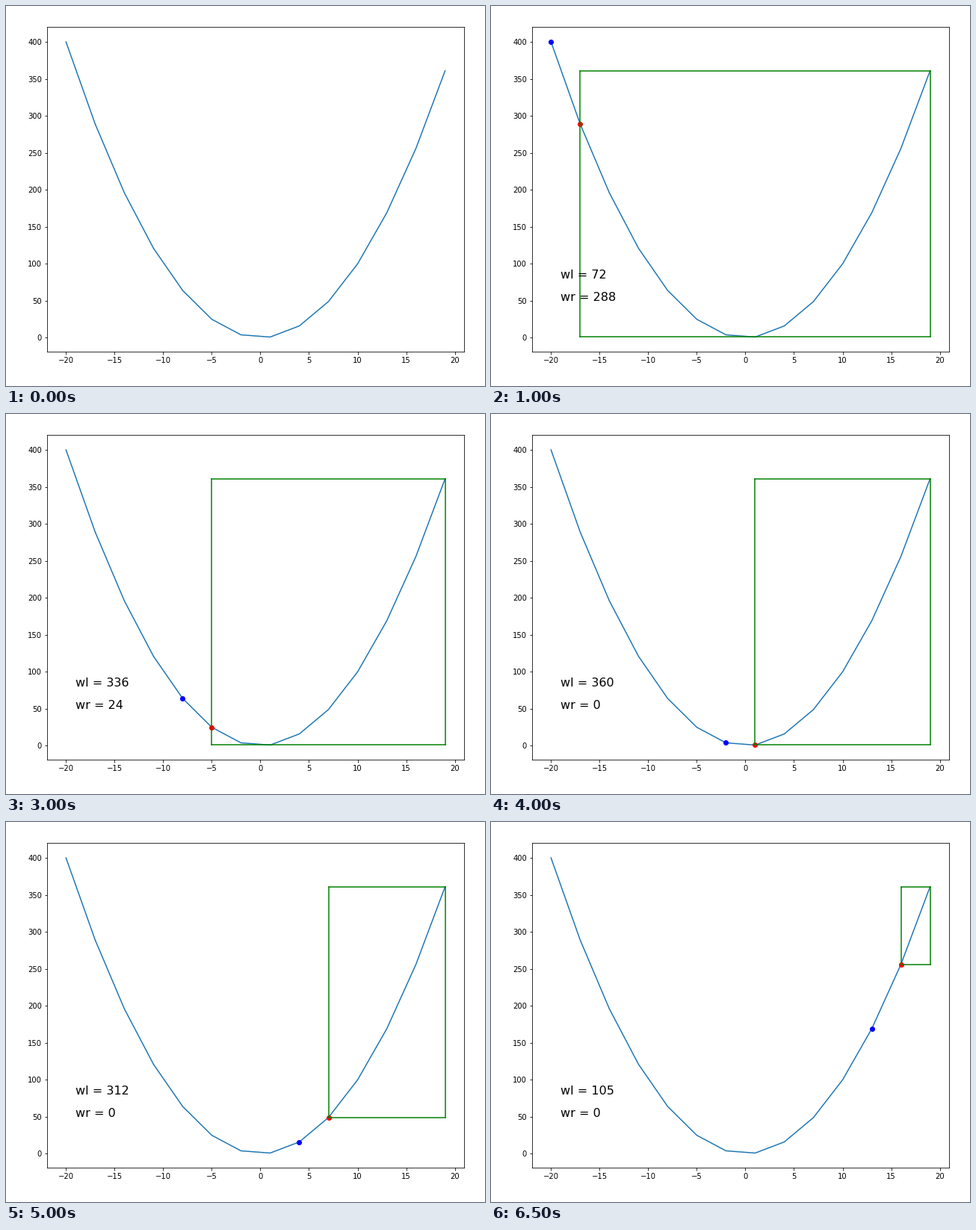
Recreate the animation shown at these times as a matplotlib script. Size 641 by 509 pixels, loop 7 s.

```python
import numpy as np
import matplotlib.pyplot as plt
from matplotlib.animation import FuncAnimation

W, H, DPI = 641, 509, 72
STEP_MS = 500

plt.rcParams["font.family"] = "DejaVu Sans"

x = np.arange(-20, 20, 3)
y = x ** 2

fig = plt.figure(figsize=(W / DPI, H / DPI), dpi=DPI, facecolor="white")
ax = fig.add_axes([54.95 / W, 45.8 / H, 558 / W, 434.88 / H])
ax.plot(x, y, color="#1f77b4", lw=1.5)
ax.set_xlim(-21.95, 20.95)
ax.set_ylim(-18.95, 419.95)
ax.set_xticks(range(-20, 21, 5))
ax.set_yticks(range(0, 401, 50))

prev_dot, = ax.plot([], [], "bo", ms=6)
cur_dot, = ax.plot([], [], "ro", ms=6)
sides = [ax.plot([], [], "g", lw=1.5)[0] for _ in range(4)]
left_label = ax.text(-19, 80, "", fontsize=16)
right_label = ax.text(-19, 50, "", fontsize=16)
moving = [prev_dot, cur_dot, *sides, left_label, right_label]


def update(frame):
    for artist in moving:
        artist.set_visible(frame > 0)
    if frame == 0:
        return moving

    i = frame - 1
    x0, x1 = x[i], x[-1]
    low, high = y[i:].min(), y[i:].max()

    # At the first point the previous index wraps round to the last one
    prev_dot.set_data([x[i - 1]], [y[i - 1]])
    cur_dot.set_data([x0], [y[i]])

    corners = [(x0, low), (x0, high), (x1, high), (x1, low)]
    for k, side in enumerate(sides):
        side.set_data(*zip(corners[k], corners[(k + 1) % 4]))

    left_label.set_text(f"wl = {high - y[i]}")
    right_label.set_text(f"wr = {y[i] - low}")
    return moving


anim = FuncAnimation(fig, update, frames=len(x), init_func=lambda: update(0),
                     interval=STEP_MS, repeat=True, repeat_delay=0, blit=False)
plt.show()
```
